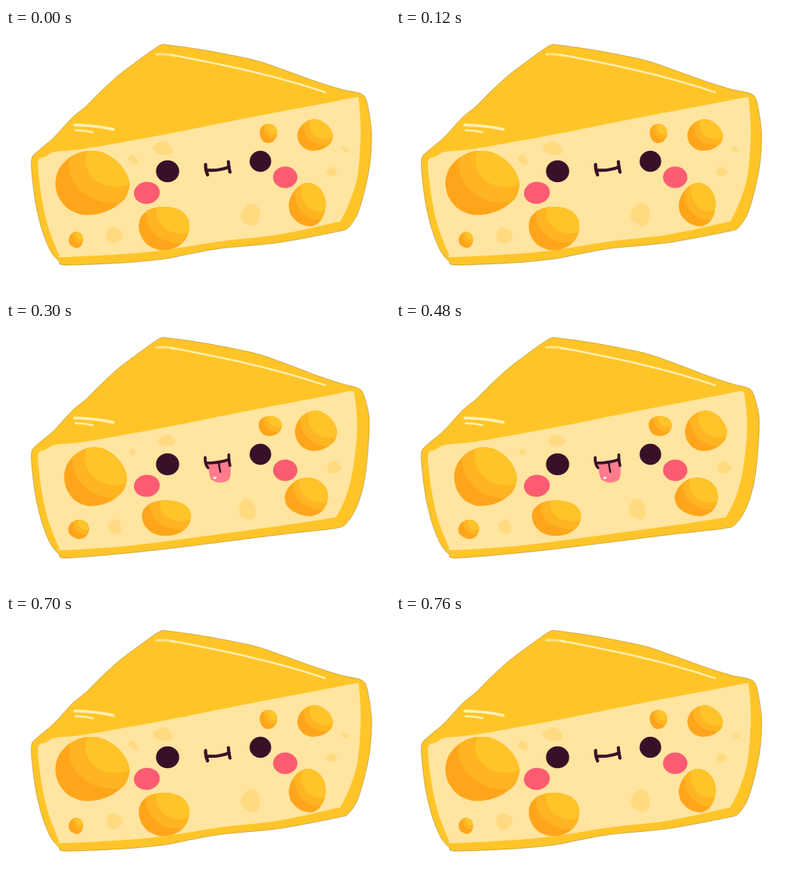
An HTML page for the animation above (800 ms loop, 480x332 px).

```html
<!DOCTYPE html>
<html lang="en">
<head>
<meta charset="utf-8">
<title>Happy cheese</title>
<style>
html, body { margin: 0; width: 100%; height: 100%; overflow: hidden; background: #fff; }
svg { display: block; width: 480px; height: 332px; }
</style>
</head>
<body>
<svg viewBox="0 0 480 332" stroke-linecap="round" stroke-linejoin="round">
  <path id="rind" fill="#ffc528" stroke="#705810" stroke-opacity=".5" stroke-width=".7"/>
  <path id="face" fill="#ffe5a0"/>
  <g fill="none" stroke="#fff0b4">
    <path d="M188 33 Q200 32 212 35" stroke-width="3" opacity=".7"/>
    <path d="M206 33.5 C260 44 330 57 399 80.500" stroke-width="2.200"/>
    <path d="M86 121.500 Q112 122 134 127" stroke-width="3.600"/>
    <path d="M87 128 Q98 128 108 130.500" stroke-width="2.400"/>
  </g>
  <g id="spots" fill="#ffda80"></g>
  <g id="holes"></g>
  <g fill="#fb5c72">
    <ellipse cx="176" cy="206.500" rx="16.200" ry="13.800" transform="rotate(-8 176 206)"/>
    <ellipse cx="349" cy="187" rx="15.200" ry="13.500"/>
  </g>
  <g fill="#3a1029">
    <ellipse cx="202" cy="179.500" rx="14.500" ry="13.800"/>
    <ellipse cx="318" cy="167" rx="13.500" ry="13.200"/>
  </g>
  <g id="mouth"></g>
</svg>
<script>
const el = id => document.getElementById(id);

// Smooth closed curve through a flat list of coordinates
function smooth(p) {
  const n = p.length / 2;
  const at = (i, k) => p[((i + n) % n) * 2 + k];
  let d = `M${p[0]} ${p[1]}`;
  for (let i = 0; i < n; i++) {
    const c = [];
    for (const k of [0, 1]) c.push(at(i, k) + (at(i + 1, k) - at(i - 1, k)) / 7);
    for (const k of [0, 1]) c.push(at(i + 1, k) - (at(i + 2, k) - at(i, k)) / 7);
    d += `C${c.map(v => v.toFixed(1)).join(' ')} ${at(i + 1, 0)} ${at(i + 1, 1)}`;
  }
  return d + 'Z';
}

// Hand-drawn oval: wobble shifts the radius a little around the edge
function blob(x, y, rx, ry, seed, wobble) {
  const p = [];
  for (let i = 0; i < 14; i++) {
    const a = i * Math.PI / 7;
    const r = 1 + wobble * Math.sin(3 * a + seed) + wobble * .5 * Math.cos(4 * a - seed);
    p.push(+(x + rx * r * Math.cos(a)).toFixed(1), +(y + ry * r * Math.sin(a)).toFixed(1));
  }
  return smooth(p);
}

const rindLeft = [
  75, 297, 66, 292, 56, 280, 46, 256, 38, 225, 33, 190, 32, 164, 40, 154,
  60, 137, 83, 112, 100, 98, 120, 78, 142, 58, 166, 40, 192, 22, 205, 21.5,
  250, 28, 310, 40, 346, 52
];
const faceLeft = [71, 287, 66, 283, 53, 250, 45, 215, 40, 168, 50, 161, 62, 155, 100, 151, 200, 133, 300, 113, 400, 94];

// holes: x, y, rx, ry, light edge, middle edge; spots: x, y, rx, ry, tilt
const poses = {
  shut: {
    rind: [388, 67, 420, 77, 443, 82, 451, 92, 457, 130, 455, 170, 448, 205, 439, 234, 428, 250,
      415, 255, 340, 269, 270, 276, 230, 283, 200, 289, 150, 294],
    face: [437, 87, 441, 91, 443.5, 130, 440, 182, 431, 214, 419, 240, 410, 244, 340, 259, 270, 267, 200, 278, 150, 283],
    holes: [
      [107, 194.5, 46, 40, .82, 1.22], [197.5, 250.5, 32, 27.5, .95, 1.3], [377, 221.5, 23, 27, 1.02, 1.32],
      [386, 134.5, 22, 19.5, .95, 1.25], [328, 132, 11, 12, .8, 1.15], [87.5, 265.5, 9, 10, .65, 1.05]
    ],
    spots: [[196, 151, 12, 8, 10], [159, 165, 7, 4.5, 45], [135, 260, 10, 10, 30],
      [306, 234, 12, 14, 0], [407, 180, 6.5, 5.5, 0], [424, 152, 5, 2.5, 25]],
    mouth: `<g fill="none" stroke="#3a1029" stroke-width="4">
      <path d="M249.500 171 Q249 178 252 184M278 167.500 Q278 174 280 180.500M250 178 Q266 179.500 279 174"/></g>`
  },
  open: {
    rind: [388, 67, 420, 77, 443, 82, 451, 92, 457, 130, 451, 186, 442, 220, 429, 250, 415, 256,
      380, 262, 300, 273, 200, 286, 130, 294],
    face: [437, 87, 441, 91, 443.5, 130, 438, 185, 430, 216, 418, 242, 410, 245, 300, 262, 200, 274, 130, 283],
    holes: [
      [108.5, 196, 46, 42.5, 1.02, 1.38], [199, 248, 32, 23.5, .95, 1.25], [375, 220.5, 27, 25.5, .95, 1.28],
      [384.5, 133, 22.5, 20, 1.05, 1.35], [330, 131, 13, 12, .85, 1.2], [88.5, 266, 12.5, 11, .7, 1.1]
    ],
    spots: [[200, 150, 13.5, 7, 18], [159, 163.5, 8, 10.5, -20], [138, 257, 10, 15, -38],
      [305.5, 232, 10.5, 13, 0], [411, 185, 7.5, 6, 20], [425, 154, 4.5, 4, 0]],
    mouth: `<path d="M251 177 Q265 178 279 173 L278 184 Q266 189 254 185Z" fill="#3a1029"/>
      <path d="M252.500 185 Q264 175 278.500 179 Q279 191 268 193.500 Q257 195 252.500 185Z" fill="#ff7c8d"/>
      <g fill="none" stroke="#3a1029" stroke-width="3.500">
      <path d="M249 171 Q248.500 179 252.500 184M278.500 167.500 Q278 175 280 181M250 177 Q266 177.500 279 173"/></g>`
  },
  tongue: {
    rind: [388, 68, 418, 78, 440, 84, 447, 92, 454, 122, 452, 168, 447, 205, 438, 234, 425, 254,
      410, 260, 340, 268, 230, 282, 150, 291],
    face: [431, 88, 436, 95, 439, 136, 434, 184, 426, 217, 414, 243, 405, 247, 340, 257, 230, 272, 150, 282],
    holes: [
      [111, 195.5, 39, 36.5, .98, 1.32], [200.5, 246.5, 31, 22.5, .9, 1.25], [376, 220.5, 27, 24, 1, 1.25],
      [387, 138, 26, 25, 1.02, 1.36], [330, 131.5, 14.5, 12.5, .8, 1.15], [91, 261, 13, 12, .75, 1.12]
    ],
    spots: [[201, 150, 10.5, 7, 0], [158, 164, 4, 4, 0], [136, 258, 8, 9.5, -25],
      [302, 236, 10.5, 13.5, -15], [410, 183.5, 8.5, 7.5, 0]],
    mouth: `<path d="M253 179 Q266 175 280 177 Q283 198 276 200.500 Q266 205 257 199 Q253 193 253 179Z" fill="#ff7c8d"/>
      <ellipse cx="261" cy="196.500" rx="2.200" ry="1.600" fill="#fff0ee"/>
      <g fill="none" stroke="#3a1029" stroke-width="3.500">
      <path d="M249 171 Q248.500 179 252.500 184M278.500 167.500 Q278 175 280 181M250 178 Q266 178 279 173.500"/>
      <path d="M266 177 Q266.500 184 268 189" stroke-width="2.400"/></g>`
  }
};

function hole([x, y, rx, ry, light, mid], i) {
  const edge = blob(x, y, rx, ry, i * 2 + 1, .025);
  const shade = (k, dx, dy, fill) =>
    `<ellipse cx="${x + rx * dx}" cy="${y - ry * dy}" rx="${rx * k}" ry="${ry * k}" fill="${fill}"/>`;
  return `<clipPath id="clip${i}"><path d="${edge}"/></clipPath>
    <path d="${edge}" fill="#ffa51b"/>
    <g clip-path="url(#clip${i})">${shade(mid, .6, .6, '#ffb421')}${shade(light, .65, .7, '#ffc429')}</g>`;
}

function spot([x, y, rx, ry, tilt], i) {
  return `<path d="${blob(x, y, rx, ry, i * 1.7, .06)}" transform="rotate(${tilt} ${x} ${y})"/>`;
}

let shown;
function show(name) {
  if (name === shown) return;
  shown = name;
  const p = poses[name];
  el('rind').setAttribute('d', smooth([...rindLeft, ...p.rind]));
  el('face').setAttribute('d', smooth([...faceLeft, ...p.face]));
  el('holes').innerHTML = p.holes.map(hole).join('');
  el('spots').innerHTML = p.spots.map(spot).join('');
  el('mouth').innerHTML = p.mouth;
}

const start = performance.now();
function tick() {
  const t = (performance.now() - start) % 800;
  show(t < 200 || t >= 700 ? 'shut' : t < 300 || t >= 600 ? 'open' : 'tongue');
  requestAnimationFrame(tick);
}
tick();
</script>
</body>
</html>
```
